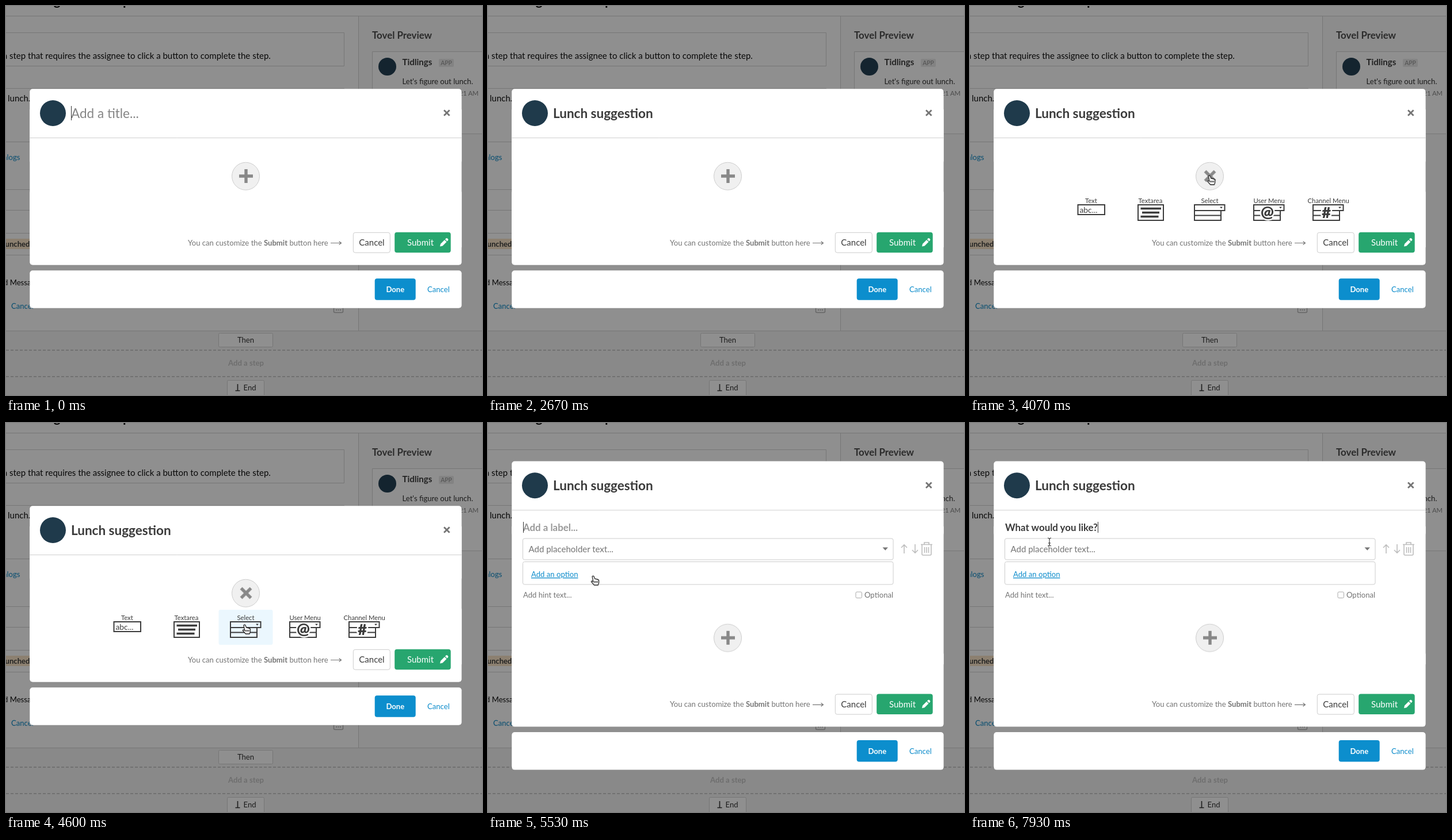
Write an HTML page that moves like this. It is 827x677 px and loops after 8 s.

```html
<!DOCTYPE html>
<html lang="en">
<head>
<meta charset="utf-8">
<title>Form builder</title>
<style>
html, body { margin: 0; width: 100%; height: 100%; overflow: hidden; background: #8d8d8d; }
svg { display: block; width: 827px; height: 677px; }
text { font: 13.125px Lato, "Open Sans", sans-serif; white-space: pre; fill: #757575; }
.xs { font-size: 11.25px; }
.m { font-size: 15px; }
.l { font-size: 16.875px; }
.xl { font-size: 22.5px; }
.b { font-weight: 700; }
.mid { text-anchor: middle; }
.end { text-anchor: end; }
.link { fill: #0b8bcb; }
.dim-link { fill: #064d70; }
.black { fill: #080808; }
.dark { fill: #3c3c3c; }
.white { fill: #fff; }
.line { fill: none; stroke: #767676; }
.edge { fill: #fff; stroke: #ccc; }

.anim, .steps { animation: 8s linear infinite; }
.steps { animation-timing-function: step-end; }
#head { animation-name: rise; }
#foot, #add { animation-name: drop; }
@keyframes rise { 0% { transform: none; } 62.4%, 100% { transform: translateY(-77.8px); } }
@keyframes drop { 0% { transform: none; } 62.4%, 100% { transform: translateY(77.8px); } }

#plus { animation-name: turn; transform-origin: 417px 296px; }
@keyframes turn {
  0%, 44% { transform: rotate(0); }
  44.9%, 63.3% { transform: rotate(45deg); }
  65.6%, 100% { transform: rotate(0); }
}
#plus path { stroke: #888; stroke-width: 5.4; animation-name: plusHot; }
@keyframes plusHot { 0% { stroke: #888; } 62.4% { stroke: #404040; } 64.1%, 100% { stroke: #888; } }
#disc { fill: #f0f0f0; stroke: #ccc; animation-name: discHot; }
@keyframes discHot { 0% { fill: #f0f0f0; } 62.4% { fill: #eaf6fc; } 64.1%, 100% { fill: #f0f0f0; } }

#menu { animation-name: menu; }
@keyframes menu {
  0% { opacity: 0; transform: translateY(-48px); }
  44.1% { opacity: .15; transform: translateY(-42px); }
  44.95% { opacity: .6; transform: translateY(-25.3px); }
  45.85% { opacity: .85; transform: translateY(-10px); }
  46.6% { opacity: .97; transform: translateY(-3px); }
  47.5% { opacity: 1; transform: none; }
  62.4%, 100% { opacity: 0; transform: none; }
}
.hot { fill: #ebf7fe; opacity: 0; }
#hotArea { animation-name: hotArea; }
#hotSelect { animation-name: hotSelect; }
@keyframes hotArea { 0% { opacity: 0; } 53% { opacity: 1; } 55.2%, 100% { opacity: 0; } }
@keyframes hotSelect { 0% { opacity: 0; } 44.95% { opacity: 1; } 45.85% { opacity: 0; } 56% { opacity: 1; } 62.4%, 100% { opacity: 0; } }
.ico { fill: none; stroke: #3c3c3c; stroke-width: 2; }
.glyph { font: 900 27px Lato, sans-serif; fill: #3c3c3c; stroke: #fff; stroke-width: 5; paint-order: stroke; }

#field { animation-name: field; }
@keyframes field {
  0% { opacity: 0; }
  62.4% { opacity: .08; }
  63.35% { opacity: .35; }
  64.1% { opacity: .62; }
  65% { opacity: .84; }
  65.85%, 100% { opacity: 1; }
}

#cursor { animation-name: move; }
@keyframes move {
  0%, 34.1% { transform: translate(47px, 404px); }
  37% { transform: translate(210px, 372px); }
  40% { transform: translate(380px, 312px); }
  42.5%, 50.8% { transform: translate(420.5px, 301.5px); }
  52.2% { transform: translate(385px, 325px); }
  53.8% { transform: translate(338px, 350px); }
  55.5% { transform: translate(390px, 360px); }
  57.5%, 63.4% { transform: translate(417px, 359px); }
  66% { transform: translate(320px, 318px); }
  70%, 72.4% { transform: translate(148px, 262px); }
  72.5%, 100% { transform: translate(138px, 207px); }
}
#cursor path { fill: #fff; stroke: #222; opacity: 0; }
#arrow { animation-name: arrow; }
#hand { animation-name: hand; }
#cursor #beam { fill: none; animation-name: beam; }
@keyframes arrow { 0% { opacity: 0; } 34.1% { opacity: 1; } 41.5% { opacity: 0; } 51.5% { opacity: 1; } 53% { opacity: 0; } 64.1% { opacity: 1; } 69%, 100% { opacity: 0; } }
@keyframes hand { 0% { opacity: 0; } 41.5% { opacity: 1; } 51.5% { opacity: 0; } 53% { opacity: 1; } 64.1% { opacity: 0; } 69% { opacity: 1; } 72.5%, 100% { opacity: 0; } }
@keyframes beam { 0% { opacity: 0; } 72.5% { opacity: 1; } 73.3% { opacity: 0; } 99.1%, 100% { opacity: 1; } }
</style>
</head>
<body>
<svg viewBox="0 0 827 677">
  <defs>
    <g id="dropBox">
      <path class="ico" d="M-26.5 346h52.5v10h-52.5zM-26.5 356v17h46v-17M-26.5 364.5h46"/>
      <path fill="#3c3c3c" d="M17.5 349.5h5l-2.5 3z"/>
    </g>
  </defs>

  <!-- Dimmed page -->
  <rect width="827" height="677" fill="#8f8f8f"/>
  <rect x="612" y="17" width="215" height="548" fill="#8c8c8c"/>
  <rect y="565" width="827" height="112" fill="#898989"/>
  <text class="xl b black" x="77" y="-1">ign lunch step here</text>
  <path class="line" d="M0 17.5H827M612.5 17V565M0 565.5H827M-5 46.5H587.5V104.5H-5M-5 143.5H587.5V236.5H-5M0 319.5H588M0 355.5H588M0 395.5H588M0 433.5H588"/>
  <text class="m black" x="-5.3" y="92">a step that requires the assignee to click a button to complete the step.</text>
  <text class="m black" x="3" y="166">lunch.</text>
  <text class="dim-link end" x="24.5" y="268">Dialogs</text>
  <rect x="-2" y="405" width="50" height="18" fill="#8c8070"/>
  <text class="b end" x="41.5" y="419" style="fill:#222">launched</text>
  <text class="black" x="-4" y="486">d Message</text>
  <text class="dim-link" x="9" y="527">Cancel</text>
  <rect class="line" x="569.5" y="515.5" width="16" height="18" rx="2" style="stroke:#666;stroke-width:1.5"/>
  <path d="M573 529h9" stroke="#666" stroke-width="2" stroke-dasharray="2 1.5"/>

  <text class="l b" x="636" y="57" style="fill:#2b2b2b">Tovel Preview</text>
  <path class="line" d="M830 79.5H636.5V222.5H830" style="fill:#8f8f8f"/>
  <circle cx="662.5" cy="105.5" r="15.5" fill="#14242f"/>
  <text class="m b" x="688.5" y="103" style="fill:#222">Tidlings</text>
  <rect x="752" y="92" width="26" height="14" rx="2" fill="#838383"/>
  <text class="mid" x="765" y="103" style="font-size:10.5px;fill:#505050">APP</text>
  <text x="688.5" y="136" style="fill:#1c1c1c">Let's figure out lunch.</text>
  <text class="xs end" x="821" y="156" style="fill:#4c4c4c">11:21 AM</text>

  <path class="line" d="M0 599H827M0 645H827" style="stroke:#717171;stroke-width:2" stroke-dasharray="5 3"/>
  <rect class="line" x="369.5" y="569.5" width="94" height="24" rx="2" style="fill:#8f8f8f"/>
  <text class="mid" x="416.5" y="586" style="fill:#1c1c1c">Then</text>
  <text class="b mid" x="417" y="626" style="fill:#6e6e6e">Add a step</text>
  <rect class="line" x="384.5" y="651.5" width="64" height="30" rx="2" style="fill:#8f8f8f"/>
  <path d="M402.5 658v11M398.5 669.5h8" fill="none" stroke="#1c1c1c" stroke-width="1.6"/>
  <text x="412.5" y="669" style="fill:#1c1c1c">End</text>

  <!-- Dialog -->
  <rect x="41.3" y="180" width="750.3" height="240" fill="#fff"/>
  <g id="foot" class="steps">
    <rect x="41.3" y="320" width="750.3" height="130.8" rx="5" fill="#fff"/>
    <text x="316" y="416.5">You can customize the <tspan class="b">Submit</tspan> button here</text>
    <path d="M564 412.5h18M578.5 409.5l4 3-4 3" fill="none" stroke="#777" stroke-width="1.2"/>
    <rect class="edge" x="603.3" y="394.3" width="64" height="35" rx="3.5"/>
    <text class="m mid dark" x="635.5" y="417">Cancel</text>
    <rect x="675.2" y="393.8" width="97.5" height="35.5" rx="4" fill="#27a66f"/>
    <text class="m white" x="697" y="417">Submit</text>
    <path class="white" d="M754 418.5l1-4.5 7-7 3.5 3.5-7 7zM763 406l1.7-1.7q1-.8 2 0l1.3 1.4q.9 1 0 2l-1.6 1.7z"/>
    <rect x="41.3" y="460.3" width="750.3" height="65.5" rx="5" fill="#fff"/>
    <rect x="640.7" y="474.3" width="71" height="37.5" rx="4" fill="#0c8ecd"/>
    <text class="b mid white" x="676.3" y="498">Done</text>
    <text class="link" x="732" y="498">Cancel</text>
  </g>

  <g id="head" class="steps">
    <rect x="41.3" y="144.3" width="750.3" height="130" rx="5" fill="#fff"/>
    <path d="M41.3 229.5H791.6" stroke="#d0d0d0"/>
    <circle cx="81.5" cy="186.5" r="22.5" fill="#1f3a4b"/>
    <path d="M761 181.2l9.6 9.6M770.6 181.2l-9.6 9.6" stroke="#757575" stroke-width="2.8"/>
    <text id="title" class="xl" x="113" y="195"></text>
    <rect id="titleCaret" y="174" width="1" height="25" fill="#333"/>
  </g>

  <g id="field" class="steps">
    <text id="label" class="l b" x="61" y="187.5"></text>
    <rect id="labelCaret" y="172" width="1" height="19" fill="#333"/>
    <rect class="edge" x="60.5" y="201" width="643.5" height="37" rx="3"/>
    <text class="m" x="70.5" y="225">Add placeholder text...</text>
    <path d="M685.5 216.5h9.5l-4.7 5.2z" fill="#777"/>
    <rect class="edge" x="60.5" y="241.5" width="643.5" height="39.5" rx="3"/>
    <text class="link" x="75" y="268" text-decoration="underline">Add an option</text>
    <text x="61" y="304">Add hint text...</text>
    <rect class="edge" x="639" y="294" width="10.5" height="10.5" rx="2" style="stroke:#aaa"/>
    <text x="654" y="304">Optional</text>
    <g fill="none" stroke="#bdbdbd" stroke-width="1.6">
      <path d="M723 227v-15M718 217l5-5 5 5M742 211v15M737 221l5 5 5-5"/>
      <path d="M752 211.5h20M758 211v-3h8v3M754 212v16q0 2 2 2h12q2 0 2-2v-16M758.5 216v10M762 216v10M765.5 216v10"/>
    </g>
  </g>

  <g id="add" class="steps">
    <circle id="disc" class="steps" cx="416.5" cy="296.2" r="24"/>
    <g id="plus" class="anim"><path class="steps" d="M405 296h24M417 284v24"/></g>
  </g>

  <g id="menu" class="steps">
    <rect id="hotArea" class="hot steps" x="266.5" y="325" width="94" height="61" rx="3"/>
    <rect id="hotSelect" class="hot steps" x="369.5" y="325" width="94" height="61" rx="3"/>
    <g id="names"></g>
    <rect class="ico" x="187.5" y="346" width="46.5" height="17"/>
    <text class="dark" x="190.5" y="359.5" style="font-size:13.8px">abc...</text>
    <rect class="ico" x="292" y="346" width="44" height="27"/>
    <path class="ico" d="M296.5 352.5h35.5M299 359.5h30M296.5 366.5h31" style="stroke-width:3.5"/>
    <use href="#dropBox" x="416.5"/>
    <use href="#dropBox" x="519.5"/>
    <use href="#dropBox" x="622.5"/>
    <text class="glyph mid" x="516.5" y="367.5">@</text>
    <text class="glyph mid" x="619" y="369">#</text>
    <path class="ico" d="M493 346h52.5M596 346h52.5"/>
  </g>

  <g id="cursor" class="anim">
    <path id="arrow" class="steps" d="M-5-8v15l3.5-3 2.5 5.5 2.5-1-2.5-5.5h5z"/>
    <path id="hand" class="steps" stroke-width="1.3" d="M-4-7q1.5-1.6 3 0l1.5 4 4.5 1q2.500.6 2.5 2.5v3.500l-1.500 4h-6.500l-5-5.500q-.6-2 1.600-1.400l1.600 1.100zM0 1v3M2.500 1v3M5 1v3"/>
    <path id="beam" class="steps" d="M-3-7q3 0 3 2.500q0-2.500 3-2.500M0-4.500v9M-3 7q3 0 3-2.500q0 2.500 3 2.500M-2 2h4"/>
  </g>
</svg>
<script>
const $ = id => document.getElementById(id);
const LOOP = 8000;

['Text', 'Textarea', 'Select', 'User Menu', 'Channel Menu'].forEach((name, i) => {
  $('names').insertAdjacentHTML('beforeend',
    `<text class="xs mid dark" x="${210.3 + i * 103.1}" y="343">${name}</text>`);
});

// keys: [time, characters typed]; hidden: spans without a caret
const inputs = [
  {
    id: 'title', text: 'Lunch suggestion', hint: 'Add a title...', hintWeight: 400, hintColor: '#858585',
    keys: [[1000, 1], [1070, 2], [1130, 3], [1200, 4], [1270, 5], [1470, 6], [1530, 7], [1600, 8],
      [1800, 9], [1870, 10], [1930, 11], [2070, 12], [2130, 14], [2200, 15], [2270, 16]],
    hidden: [[200, 530], [800, 1000], [2670, LOOP]]
  },
  {
    id: 'label', text: 'What would you like?', hint: 'Add a label...', hintWeight: 700, hintColor: '#999',
    keys: [[6130, 1], [6200, 2], [6270, 3], [6330, 5], [6670, 6], [6730, 7], [6800, 8], [6930, 9],
      [7000, 10], [7200, 12], [7270, 13], [7330, 15], [7470, 16], [7530, 17], [7600, 19], [7730, 20]],
    hidden: [[5800, 5870], [6600, 6670]]
  }
];

function type(f, t) {
  const el = $(f.id), caret = $(f.id + 'Caret');
  const count = f.keys.reduce((n, [at, c]) => t >= at ? c : n, 0);
  if (count !== f.count) {
    f.count = count;
    el.textContent = count ? f.text.slice(0, count) : f.hint;
    el.style.fontWeight = count ? 700 : f.hintWeight;
    el.style.fill = count ? '#3a3a3a' : f.hintColor;
  }
  const width = count ? el.getComputedTextLength() : 0;
  caret.setAttribute('x', +el.getAttribute('x') + width);
  caret.style.opacity = f.hidden.some(([a, b]) => t >= a && t < b) ? 0 : 1;
}

const start = performance.now();
function frame() {
  const t = (performance.now() - start) % LOOP;
  inputs.forEach(f => type(f, t));
  requestAnimationFrame(frame);
}
frame();
</script>
</body>
</html>
```
